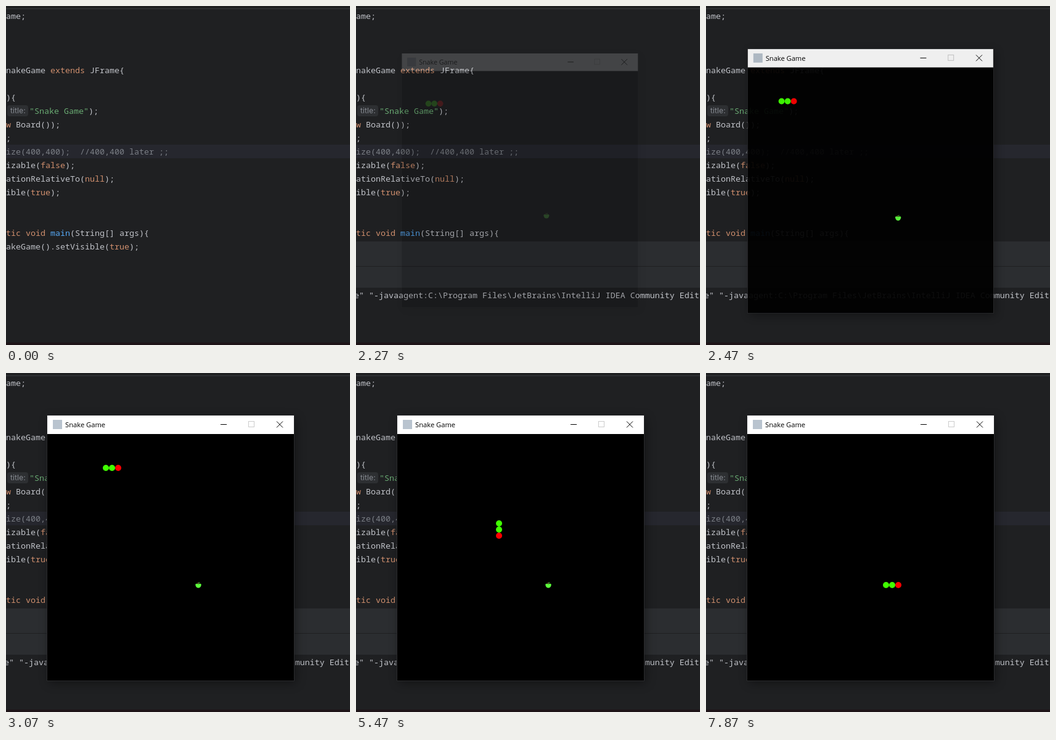
An HTML page for the animation above (8 s loop, 558 by 550 pixels).

```html
<!DOCTYPE html>
<html lang="en">
<head>
<meta charset="utf-8">
<title>Snake</title>
<style>
html, body { margin: 0; width: 100%; height: 100%; overflow: hidden; background: #1f2022; }
svg { display: block; width: 558px; height: 550px; }
text { white-space: pre; }
.code { font: 500 13.333px "Noto Sans Mono", "DejaVu Sans Mono", monospace; fill: #c0c2c8; }
.kw { fill: #cf8e6d; }
.str { fill: #6aab73; }
.rem { fill: #7a7e85; }
.fn { fill: #56a8f5; }
.hint { font: 12.3px Inter, sans-serif; fill: #868a91; }
.title { font: 11.2px "Open Sans", sans-serif; fill: #000; }
#shadow { filter: drop-shadow(3px 4px 8px rgba(0, 0, 0, .4)); }
</style>
</head>
<body>
<svg viewBox="0 0 558 550">
  <rect width="558" height="550" fill="#1f2022"/>
  <rect y="4" width="558" height="1" fill="#393b40"/>
  <rect y="225" width="558" height="22" fill="#26272e"/>
  <rect x="2" y="161" width="34" height="18" rx="4" fill="#2d2f32"/>
  <text class="hint" x="7" y="174">title:</text>
  <g id="code"></g>
  <rect id="caret" x="216" y="227" width="2" height="18" fill="#ced0d6"/>
  <g id="panel">
    <rect y="382" width="558" height="75" fill="#2b2d30"/>
    <rect y="422" width="558" height="1" fill="#1f2022"/>
    <rect y="457" width="558" height="89" fill="#1f2022"/>
  </g>
  <text id="log" class="code" x="-3" y="474">e" "-javaagent:C:\Program Files\JetBrains\IntelliJ IDEA Community Edit</text>
  <rect y="546" width="558" height="4" fill="#1f1519"/>

  <g id="win">
    <rect id="shadow" x="67" y="69" width="400" height="430"/>
    <rect x="66.5" y="68.5" width="401" height="431" fill="none" stroke="#2a2b2d"/>
    <rect x="67" y="69" width="400" height="30" fill="#fff"/>
    <rect x="67" y="99" width="400" height="400" fill="#000"/>
    <rect x="76" y="76" width="15" height="15" fill="#b9c4cf"/>
    <text class="title" x="96" y="88">Snake Game</text>
    <g fill="none" stroke="#000">
      <path d="M348 83.5h10M439 78.5l10 10M449 78.5l-10 10"/>
      <rect x="393.5" y="78.5" width="9" height="9" stroke="#ccc"/>
    </g>
    <g id="apple">
      <path d="M312 342.5C309 341 307 342 307.3 344C308 347 309.5 349 312 348.6C314.5 349 316 347 316.7 344C317 342 315 341 312 342.5Z" fill="#5cff3c"/>
      <path d="M312 342.5L310.5 340" stroke="#9a5a3a"/>
      <path d="M311.8 341.8Q312 339.5 314 339.3Q314 341.3 311.8 341.8Z" fill="#5cff3c"/>
    </g>
    <g id="snake">
      <circle r="5" fill="#f00"/>
      <circle r="5" fill="#40ff00"/>
      <circle r="5" fill="#40ff00"/>
    </g>
  </g>
</svg>
<script>
const LOOP = 8000;
const $ = id => document.getElementById(id);
const show = (id, on) => { $(id).style.display = on ? '' : 'none'; };

// Each line: x, baseline, then text or [class, text] runs.
const lines = [
  [0, 21, 'ame;'],
  [0, 109, 'nakeGame ', ['kw', 'extends'], ' JFrame{'],
  [0, 153, '){'],
  [38, 175, ['str', '"Snake Game"'], ');'],
  [0, 197, ['kw', 'w'], ' Board());'],
  [0, 219, ';'],
  [0, 241, ['rem', 'ize(400,400);  //400,400 later ;;']],
  [0, 263, 'izable(', ['kw', 'false'], ');'],
  [0, 285, 'ationRelativeTo(', ['kw', 'null'], ');'],
  [0, 307, 'ible(', ['kw', 'true'], ');'],
  [0, 373, ['kw', 'tic void '], ['fn', 'main'], '(String[] args){'],
  [0, 395, 'akeGame().setVisible(', ['kw', 'true'], ');']
];

function svg(tag, attrs, parent) {
  const el = document.createElementNS('http://www.w3.org/2000/svg', tag);
  for (const k in attrs) el.setAttribute(k, attrs[k]);
  return parent.appendChild(el);
}

for (const [x, y, ...runs] of lines) {
  const line = svg('text', { class: 'code', x, y }, $('code'));
  for (const run of runs) {
    const [cls, str] = Array.isArray(run) ? run : ['', run];
    svg('tspan', { class: cls }, line).textContent = str;
  }
}

// Window opening: time, opacity, scale.
const opening = [
  [2270, .16, .957], [2330, .52, .979], [2400, .78, .989],
  [2470, .93, .995], [2530, .98, .999], [2600, 1, 1]
];

const ticks = [
  2470, 2600, 2730, 2930, 3070, 3200, 3400, 3530, 3670, 3800,
  3930, 4070, 4270, 4400, 4530, 4670, 4870, 5000, 5130, 5270,
  5470, 5600, 5730, 5930, 6070, 6200, 6330, 6530, 6670,
  6800, 7000, 7130, 7270, 7400, 7600, 7730, 7870
];

// Cell centre after n moves: 10 right, 19 down, then right.
function cell(n) {
  const down = Math.max(0, Math.min(n - 10, 19));
  return [132 + 10 * (n - down), 154 + 10 * down];
}

const balls = [...$('snake').children];

function draw(t) {
  show('caret', (t >= 670 && t < 1330) || (t >= 2130 && t < 2270));
  show('panel', t >= 1600);
  show('log', t >= 1730);

  const step = opening.filter(s => s[0] <= t).pop();
  show('win', step);
  if (!step) return;
  const [, alpha, scale] = step;
  $('win').setAttribute('opacity', alpha);
  $('win').setAttribute('transform', `translate(240 255) scale(${scale}) translate(-240 -255)`);

  const moves = ticks.filter(k => k <= t).length;
  balls.forEach((ball, i) => {
    const [x, y] = cell(moves - i);
    ball.setAttribute('cx', x);
    ball.setAttribute('cy', y);
  });
  show('apple', moves < ticks.length);
}

function loop() {
  draw(performance.now() % LOOP);
  requestAnimationFrame(loop);
}
loop();
</script>
</body>
</html>
```
